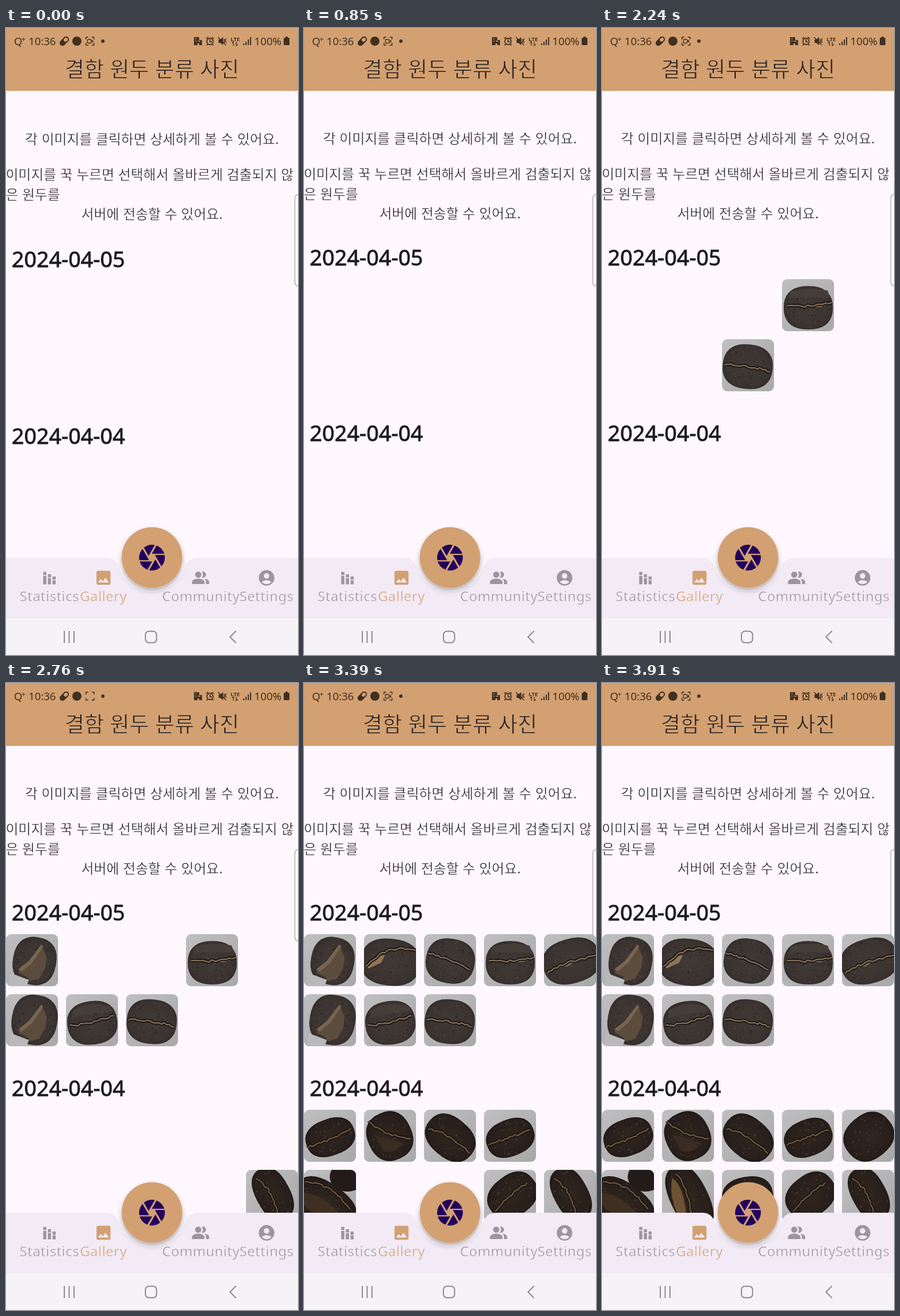
An HTML page for the animation above (4.06 s loop, 511 by 1096 pixels).

```html
<!DOCTYPE html>
<html lang="ko">
<head>
<meta charset="utf-8">
<title>Bean gallery</title>
<style>
html, body { margin: 0; width: 100%; height: 100%; overflow: hidden; background: #fef8fe; }
svg { display: block; width: 100vw; height: 100vh; }
/* a thin stroke in the background colour lightens the letters */
.ko { font: 300 24px "Noto Sans CJK KR", "Noto Sans CJK JP", sans-serif; fill: #1d1b20; stroke: #fef8fe; stroke-width: .5; }
.mid { text-anchor: middle; }
.title { font-size: 37.2px; stroke: #d3a071; stroke-width: .9; }
.date { font: 400 38px "Noto Sans", sans-serif; fill: #1d1b20; stroke: #1d1b20; stroke-width: .8; }
.label { font: 300 24.2px "Noto Sans", sans-serif; letter-spacing: .4px; text-anchor: middle; stroke: #f2eaf5; stroke-width: .6; }
.status { font: 400 18.7px "Noto Sans", sans-serif; }
</style>
</head>
<body>
<svg viewBox="0 0 511 1096" preserveAspectRatio="none">
  <defs>
    <clipPath id="tile"><rect width="91" height="91" rx="9"/></clipPath>
    <linearGradient id="paper" x2="1" y2="1">
      <stop stop-color="#bfbfc1"/><stop offset="1" stop-color="#a8a8a9"/>
    </linearGradient>
    <radialGradient id="light" r=".6">
      <stop stop-color="#403936"/><stop offset=".75" stop-color="#3a3330"/><stop offset="1" stop-color="#2b2523"/>
    </radialGradient>
    <radialGradient id="dark" r=".6">
      <stop stop-color="#30261f"/><stop offset=".75" stop-color="#281f1b"/><stop offset="1" stop-color="#1a1412"/>
    </radialGradient>
    <filter id="shade" x="-30%" y="-30%" width="160%" height="160%">
      <feDropShadow dx="0" dy="5" stdDeviation="4" flood-opacity=".3"/>
    </filter>
  </defs>

  <rect width="511" height="1096" fill="#fef8fe"/>
  <path d="M512 291Q505.500 291 505.500 298V444Q505.500 451 512 451" fill="#fff" stroke="#b0acb1" stroke-width="1.500"/>

  <g id="page">
    <text class="ko mid" x="255.500" y="202">각 이미지를 클릭하면 상세하게 볼 수 있어요.</text>
    <text class="ko" x="-.500" y="263.500">이미지를 꾹 누르면 선택해서 올바르게 검출되지 않</text>
    <text class="ko" x="-.500" y="298.500">은 원두를</text>
    <text class="ko mid" x="255.500" y="332.500">서버에 전송할 수 있어요.</text>
    <text class="date" x="10" y="415">2024-04-05</text>
    <text class="date" x="10" y="722">2024-04-04</text>
    <g id="tiles"></g>
    <path id="spinner" d="M237 878A25 25 0 0 1 274 878" fill="none" stroke="#21005d" stroke-width="5"/>
  </g>

  <rect width="511" height="110" fill="#d3a071"/>
  <text class="ko mid title" x="255.500" y="86">결함 원두 분류 사진</text>

  <g fill="#403020">
    <g class="status">
      <text x="14" y="29.500">Q</text><text x="27" y="24" font-size="13">+</text>
      <text x="39.500" y="29.500">10:36</text><text x="434.500" y="29.500">100%</text>
    </g>
    <g transform="rotate(-45 102 23)">
      <rect x="92.500" y="18" width="19" height="10" rx="5"/>
      <rect x="102" y="20" width="7.500" height="6" rx="3" fill="#d3a071"/>
    </g>
    <circle cx="124" cy="23" r="8"/>
    <circle cx="169.500" cy="23" r="3"/>
    <path d="M140 20V16H144M150 16H154V20M154 26V30H150M144 30H140V26" fill="none" stroke="#403020" stroke-width="1.500"/>
    <g id="rec"><rect x="142.500" y="20" width="6.500" height="6.500" rx="1.500" fill="none" stroke="#403020" stroke-width="1.400"/><path d="M149 23L152.500 20.500V26Z"/></g>
    <path d="M329 16H338V21H343V30H338V27H335V30H329Z"/>
    <path d="M331.500 19H333.500M331.500 23H333.500M336 23H340" stroke="#d3a071" stroke-width="1.500"/>
    <g fill="none" stroke="#403020" stroke-width="1.800">
      <circle cx="357" cy="23.500" r="5.500"/><path d="M357 20V24H360M350.500 18.500L354 16M363.500 18.500L360 16M353 28L351 30.500M361 28L363 30.500"/>
      <path d="M371 16L385 30M382 19V27M385 18L384 22L385 26" stroke-width="1.500"/>
      <path d="M398 31V24L395.500 26.500M403 24V31L405.500 28.500" stroke-width="1.300"/>
    </g>
    <path d="M372 20H375L380 16V30L375 26H372Z"/>
    <text x="401" y="22.500" class="mid" font-family="Noto Sans, sans-serif" font-size="9.500" font-weight="700">LTE</text>
    <path d="M415 27h2v3h-2zM419 24h2v6h-2zM423 20h2v10h-2zM427 16h2v14h-2z"/>
    <path d="M489 15h4v2h1.500q1.500 0 1.500 1.500v10q0 1.500-1.500 1.500h-7q-1.500 0-1.500-1.500v-10q0-1.500 1.500-1.500h1.500z"/>
  </g>

  <path d="M0 926H175Q192 926 197 942A61 61 0 0 0 314 942Q319 926 336 926H511V1033H0Z" fill="#f2eaf5"/>
  <rect y="1032" width="511" height="64" fill="#f5f3f7"/>
  <g fill="#9b959d">
    <path transform="translate(59.700 945.200)scale(1.360)" d="M4 9h4v11H4zM4 4h4v4H4zM10 7h4v4h-4zM16 10h4v4h-4zM16 15h4v5h-4zM10 12h4v8h-4z"/>
    <path transform="translate(324.200 944.700)scale(1.360)" d="M16.670 13.130C18.040 14.060 19 15.320 19 17v3h4v-3c0-2.180-3.570-3.470-6.330-3.870zM15 12c2.210 0 4-1.790 4-4s-1.790-4-4-4c-.47 0-.91.1-1.330.24C14.500 5.270 15 6.580 15 8s-.5 2.730-1.330 3.760c.42.14.86.24 1.330.24zM9 12c2.210 0 4-1.790 4-4s-1.790-4-4-4-4 1.790-4 4 1.790 4 4 4zm0 1c-2.670 0-8 1.340-8 4v3h16v-3c0-2.660-5.330-4-8-4z"/>
    <path transform="translate(439.700 944.900)scale(1.360)" d="M12 2C6.480 2 2 6.480 2 12s4.480 10 10 10 10-4.480 10-10S17.520 2 12 2zm0 4c1.930 0 3.500 1.570 3.500 3.500S13.930 13 12 13s-3.500-1.570-3.500-3.500S10.070 6 12 6zm0 14c-2.030 0-4.430-.82-6.140-2.880C7.550 15.800 9.680 15 12 15s4.450.8 6.140 2.120C16.430 19.180 14.030 20 12 20z"/>
    <g class="label">
      <text x="76" y="1002">Statistics</text>
      <text x="341" y="1002">Community</text>
      <text x="456" y="1002">Settings</text>
      <text x="170.500" y="1002" fill="#d3a071">Gallery</text>
    </g>
  </g>
  <path fill="#d3a071" transform="translate(154.300 944.700)scale(1.360)" d="M21 19V5c0-1.100-.9-2-2-2H5c-1.100 0-2 .9-2 2v14c0 1.100.9 2 2 2h14c1.100 0 2-.9 2-2zM8.500 13.500l2.500 3.010L14.500 12l4.500 6H5l3.500-4.500z"/>

  <circle cx="255.500" cy="925.500" r="53" fill="#d3a071" filter="url(#shade)"/>
  <path fill="#21005d" transform="translate(228.500 898.800)scale(2.250)" d="M9.400 10.500l4.770-8.260C13.470 2.090 12.750 2 12 2c-2.400 0-4.600.85-6.320 2.250l3.660 6.350.06-.1zM21.540 9c-.92-2.920-3.150-5.260-6-6.340L11.880 9h9.660zm.26 1h-7.490l.29.5 4.760 8.250C21 16.970 22 14.610 22 12c0-.69-.07-1.350-.2-2zM8.540 12l-3.900-6.750C3.010 7.030 2 9.390 2 12c0 .69.07 1.350.2 2h7.490l-1.150-2zm-6.080 3c.92 2.920 3.150 5.260 6 6.340L12.120 15H2.460zm11.270 0l-3.900 6.760c.7.15 1.420.24 2.170.24 2.400 0 4.600-.85 6.320-2.250l-3.660-6.350-.93 1.600z"/>
  <g fill="none" stroke="#8b898e" stroke-width="2">
    <path d="M102 1054V1075M110.500 1054V1075M119 1054V1075M402.500 1054L392 1064.500L402.500 1075"/>
    <rect x="244" y="1054.500" width="19.500" height="20" rx="6"/>
  </g>
</svg>

<script>
const LOOP = 4060, STRETCH = .0088;
const $ = id => document.getElementById(id);
const rowY = [439, 544, 746, 851];
const tiles = [];

let seed = 7;
const rnd = () => (seed = seed * 16807 % 2147483647) / 2147483647;
const patch = (d, color) => `<path d="${d}" fill="${color}"/>`;

// Rough line along a quadratic curve given as "x y cx cy x y"
function crease(points, color) {
  if (!points) return '';
  const [a, b, c, d, e, f] = points.split(' ').map(Number);
  let line = '';
  for (let i = 0; i <= 16; i++) {
    const t = i / 16, u = 1 - t, p = u * u, q = 2 * u * t, r = t * t;
    const x = p * a + q * c + r * e + rnd() * 2 - 1;
    const y = p * b + q * d + r * f + rnd() * 4 - 2;
    line += (i ? 'L' : 'M') + x.toFixed(1) + ' ' + y.toFixed(1);
  }
  const stroke = (color, width) =>
    `<path d="${line}" fill="none" stroke="${color}" stroke-width="${width}" stroke-linejoin="round"/>`;
  return stroke('#1c1614', 6) + stroke(color, 2.2);
}

// Slightly squared ellipse
function outline(rx, ry) {
  const bend = v => Math.sign(v) * Math.abs(v) ** .84;
  let d = '';
  for (let i = 0; i < 36; i++) {
    const a = i * Math.PI / 18;
    d += (i ? 'L' : 'M') + (rx * bend(Math.cos(a))).toFixed(1) + ' ' + (ry * bend(Math.sin(a))).toFixed(1);
  }
  return d + 'Z';
}

function flecks(rx, ry) {
  let out = '';
  for (let i = 0; i < 60; i++) {
    const r = Math.sqrt(rnd()) * .92, a = rnd() * 2 * Math.PI;
    out += `<circle cx="${(rx * r * Math.cos(a)).toFixed(1)}" cy="${(ry * r * Math.sin(a)).toFixed(1)}" r="${(.6 + rnd()).toFixed(1)}" fill="${i % 2 ? '#5a4e46' : '#1f1917'}" opacity=".5"/>`;
  }
  return out;
}

// shape is "cx cy rx ry angle"; extra is drawn over the bean
function bean(time, col, row, shape, line, extra = '') {
  const [cx, cy, rx, ry, angle] = shape.split(' ').map(Number);
  const [roast, tan] = row < 2 ? ['light', '#84705a'] : ['dark', '#6f573c'];
  const g = document.createElementNS('http://www.w3.org/2000/svg', 'g');
  g.setAttribute('transform', `translate(${col * 105} ${rowY[row]})`);
  g.innerHTML = `<g clip-path="url(#tile)"><rect width="91" height="91" fill="url(#paper)"/>
    <g transform="translate(${cx} ${cy})rotate(${angle})">
    ${patch(outline(rx, ry), `url(#${roast})`)}${flecks(rx, ry)}</g>${extra}${crease(line, tan)}</g>`;
  $('tiles').append(g);
  tiles.push({ g, time });
}

const chip = patch('M8 68L24 74L40 80L36 91H4Z', '#b9b9bb') +
  patch('M62 18L71 40L69 58L58 78L42 82L36 74L23 68L22 61L40 47Z', '#5c4c3d') +
  patch('M62 18L65 22L46 50L28 65L22 61L40 47Z', '#786550');

bean(2390, 0, 0, '50 47 38 42 10', '', chip);
bean(3180, 1, 0, '46 49 52 41 6', '2 58 38 14 91 30', patch('M4 56L22 40L37 36L30 50L8 60Z', '#8e7555'));
bean(3270, 2, 0, '46 47 43 39 10', '6 34 42 40 80 62');
bean(910, 3, 0, '46 50 43 38 0', '8 46 44 50 87 42', patch('M15 22Q45 12 80 20L84 33Q45 30 12 34Z', '#453d38') + patch('M52 45L66 41L84 42L70 48L54 49Z', '#947a5c'));
bean(3360, 4, 0, '48 47 51 39 -16', '5 68 38 46 91 38', patch('M20 60L38 49L56 46L42 56Z', '#806a50'));
bean(2390, 0, 1, '50 45 40 44 10', '', chip);
bean(2480, 1, 1, '46 50 44 38 -8', '6 55 48 52 84 37', patch('M12 28Q45 10 78 22L82 30Q40 34 10 42Z', '#453d38'));
bean(1180, 2, 1, '45 48 44 39 6', '4 44 50 46 84 56');

bean(3180, 0, 2, '46 48 44 32 -20', '6 66 45 54 82 32');
bean(3300, 1, 2, '45 46 39 43 -25', '8 20 34 46 82 50', patch('M18 44Q40 50 68 58Q55 78 34 72Z', '#3b2c22'));
bean(3390, 2, 2, '46 49 47 35 40', '8 33 48 42 80 76');
bean(3030, 3, 2, '46 49 43 32 -22', '9 60 45 50 82 34');
bean(3420, 4, 2, '47 47 45 39 -40', '');
bean(2910, 0, 3, '36 62 62 39 36', '2 20 50 24 80 70',
  '<ellipse cx="76" cy="12" rx="31" ry="26" fill="#231b18"/>' + patch('M0 40Q30 42 62 76H20Q5 70 0 60Z', '#3f2f23'));
bean(3450, 1, 3, '48 50 33 62 -26', '24 6 48 36 52 86', patch('M18 14Q38 30 42 75H26Q12 42 18 14Z', '#6e5233'));
bean(3520, 2, 3, '45 48 45 36 -10', '6 56 45 48 84 40');
bean(3030, 3, 3, '50 45 46 36 -38', '20 72 42 44 76 24');
bean(2480, 4, 3, '47 42 30 49 -28', '18 16 46 30 55 78');

function draw(now) {
  const t = now % LOOP;
  const left = 1 - Math.min(1, Math.max(0, (t - 60) / 390));
  const scale = 1 + STRETCH * left * left;
  $('page').setAttribute('transform', `translate(0 110)scale(1 ${scale})translate(0 -110)`);
  for (const { g, time } of tiles) g.style.display = t >= time ? '' : 'none';
  $('spinner').style.display = t >= 3450 && t < 3520 ? '' : 'none';
  const blink = t % 1010;
  $('rec').style.display = blink > 380 && blink < 820 ? 'none' : '';
  requestAnimationFrame(draw);
}
requestAnimationFrame(draw);
</script>
</body>
</html>
```
